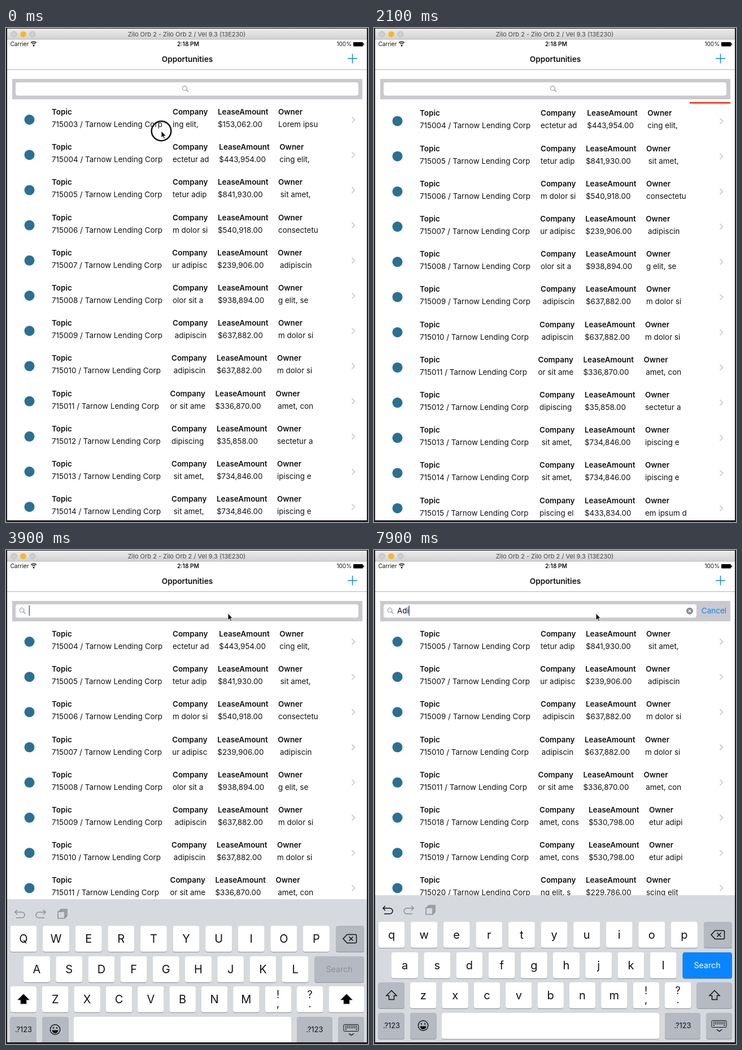
An HTML page that plays this animation: 641 by 873 pixels, repeating every 8000 ms.

```html
<!DOCTYPE html>
<html lang="en">
<head>
<meta charset="utf-8">
<title>Opportunities</title>
<style>
  html, body { margin: 0; width: 100%; height: 100%; overflow: hidden; background: #fff; }
  svg { display: block; width: 641px; height: 873px; }
  text { font: 13.45px Inter, Roboto, sans-serif; fill: #111; white-space: pre; }
  .b { font-weight: 600; }
  .mid { text-anchor: middle; }
  .line { fill: none; stroke: #111; stroke-width: 1.5; }
  .soft { stroke: #8b8e94; }
  .key { font-size: 20px; }
  .small { font-size: 12.8px; }
</style>
</head>
<body>
<svg id="stage" viewBox="0 0 641 873"></svg>
<script>
const ROW = 62.2, TOP = 131, LOOP = 8000;
const LIGHT = '#fff', DARK = '#b4b9c2', BLUE = '#0885ff';

// number, company x, company, amount, owner, company column width
const records = [
  [3, 295, 'ing elit,', '153,062', 'Lorem ipsu'],
  [4, 295, 'ectetur ad', '443,954', 'cing elit,', 82.3],
  [5, 295, 'tetur adip', '841,930', ' sit amet,'],
  [6, 295, 'm dolor si', '540,918', 'consectetu'],
  [7, 294.3, 'ur adipisc', '239,906', ' adipiscin'],
  [8, 295, 'olor sit a', '938,894', 'g elit, se'],
  [9, 295, ' adipiscin', '637,882', 'm dolor si'],
  [10, 293, ' adipiscin', '637,882', 'm dolor si'],
  [11, 290.5, 'or sit ame', '336,870', ' amet, con'],
  [12, 293, 'dipiscing ', '35,858', 'sectetur a'],
  [13, 293, ' sit amet,', '734,846', 'ipiscing e'],
  [14, 293, ' sit amet,', '734,846', 'ipiscing e'],
  [15, 293, 'piscing el', '433,834', 'em ipsum d'],
  [18, 293, 'amet, cons', '530,798', 'etur adipi', 87],
  [19, 293, 'amet, cons', '530,798', 'etur adipi', 87],
  [20, 295, 'ng elit, s', '229,786', 'scing elit']
];
const all = records.map(r => r[0]);
const results = {
  '': all.slice(1),
  A: all.slice(1),
  Ad: [4, 5, 7, 9, 10, 11, 18, 19, 20],
  Adi: [5, 7, 9, 10, 11, 18, 19, 20]
};

const text = (x, y, s, cls = '', more = '') =>
  `<text x="${x}" y="${y}" class="${cls}" ${more}>${s}</text>`;
const rect = (x, y, w, h, fill, more = '') =>
  `<rect x="${x}" y="${y}" width="${w}" height="${h}" fill="${fill}" ${more}/>`;
const path = (d, x = 0, y = 0, cls = 'line', more = '') =>
  `<path d="${d}" transform="translate(${x} ${y})" class="${cls}" ${more}/>`;
const dot = (x, y, r, fill, more = '') =>
  `<circle cx="${x}" cy="${y}" r="${r}" fill="${fill}" ${more}/>`;

function row([n, cx, company, amount, owner, w = 80]) {
  const lx = cx + w, ox = lx + 107;
  const col = (x, head, value) => text(x, 22, head, 'b') + text(x, 44, value);
  return `<g id="r${n}">${rect(9, 0, 622, ROW + .5, '#fff')}<g>` +
    dot(41.5, 31, 9, '#2a7094') +
    col(81, 'Topic', `${715000 + n} / Tarnow Lending Corp`) +
    col(cx, 'Company', company) + col(lx, 'LeaseAmount', `$${amount}.00`) +
    col(ox, 'Owner', owner) +
    path('M-2.5-5L2.5 0L-2.5 5', 615, 31, 'line', 'style="stroke:#c5c5ca"') +
    (n === 3 ? rect(631, 0, 76, ROW, '#ff2600') +
      text(667, 36, 'Delete', 'mid', 'style="fill:#fff;font-size:14px"') : '') +
    '</g></g>';
}

// keys are laid out relative to the keyboard's top edge
function key(x, y, w, fill, cls = '') {
  return rect(x, y + 1, w, 46, '#8d9096', 'rx="4"') + rect(x, y, w, 46, fill, `rx="4" class="${cls}"`);
}
function letters(s, x, y, pitch, w) {
  return [...s].map((c, i) => key(x + i * pitch, y, w, LIGHT) +
    text(x + i * pitch + w / 2, y + 30, c, 'key mid letter')).join('');
}
function keyboard() {
  const undo = 'M-4-7L-8-3L-4 1M-8-3H4a5 5 0 0 1 0 10H-6';
  const shift = 'M0-8.5L9 .5H4.5V7.5H-4.5V.5H-9Z';
  const pair = (x, a, b) => key(x, 154, 46.5, LIGHT) +
    text(x + 23.2, 175, a, 'mid', 'style="font-size:18px"') +
    text(x + 23.2, 191, b, 'mid', 'style="font-size:18px"');
  let dots = '';
  for (let j = 0; j < 3; j++) for (let i = 0; i < 7; i++)
    if (j < 2 || i < 1 || i > 5) dots += rect(601 + i * 3.1, 223.5 + j * 3, 1.8, 1.6, '#111');
  return rect(0, 0, 641, 270, '#d6d9de') +
    path(undo, 24, 26, 'line soft', 'id="undo"') +
    `<g transform="translate(62 26) scale(-1 1)">${path(undo, 0, 0, 'line soft')}</g>` +
    path('M-3-4V-8H8V4H4M-8-4H4V8H-8ZM-5-4V-6H6V6H4', 100, 26, 'line soft') +
    letters('QWERTYUIOP', 7.5, 47, 57.6, 47) +
    key(584, 47, 50, DARK) +
    path('M-12 0L-5-7.5H9.5Q11.5-7.5 11.5-5.5V5.5Q11.5 7.5 9.5 7.5H-5ZM-1.5-3.5L5.5 3.5M5.5-3.5L-1.5 3.5', 609, 70) +
    letters('ASDFGHJKL', 31, 101, 57.2, 47) +
    key(546.5, 101, 87.5, DARK, 'go') +
    text(590, 128.5, 'Search', 'mid', 'id="go" style="font-size:14.2px"') +
    key(7.5, 154, 46.5, LIGHT, 'shift') + path(shift, 31, 177, 'line arrow') +
    letters('ZXCVBNM', 64, 154, 56.35, 46.5) +
    pair(458.5, '!', ',') + pair(515, '?', '.') +
    key(571.5, 154, 62.5, LIGHT, 'shift') + path(shift, 603, 177, 'line arrow') +
    key(7.5, 208, 46.5, DARK) + text(31, 235, '.?123', 'small mid') +
    key(64, 208, 46.5, DARK) + dot(87, 230.5, 8.7, 'none', 'stroke="#111" stroke-width="1.4"') +
    dot(84, 227.5, 1.3, '#111') + dot(90, 227.5, 1.3, '#111') +
    path('M-5.5 0H5.5A5.5 5.5 0 0 1-5.5 0Z', 87, 231.5, '', 'fill="#111"') +
    key(120, 208, 385, LIGHT) +
    key(515, 208, 63, DARK) + text(546.5, 235, '.?123', 'small mid') +
    key(588, 208, 46, DARK) + rect(598, 221.5, 26, 12, 'none', 'rx="1.5" stroke="#111"') + dots +
    path('M-4.5-1.5L0 1.5L4.5-1.5', 611.5, 239);
}

const stage = document.getElementById('stage');
stage.innerHTML = `
  <defs>
    <linearGradient id="bar" x2="0" y2="1"><stop stop-color="#ececec"/><stop offset="1" stop-color="#d2d2d2"/></linearGradient>
    <clipPath id="table">${rect(9.5, 126, 621.5, 747, '#000')}</clipPath>
  </defs>
  ${rect(0, 0, 641, 873, '#fff')}
  <g clip-path="url(#table)">${records.map(row).join('')}</g>
  ${rect(0, 1, 641, 19, 'url(#bar)')}${rect(0, 19.5, 641, 1, '#b9b9b9')}
  ${dot(14, 11, 5, '#cfcfcf', 'stroke="#b9b9b9"')}${dot(30.5, 11, 5.3, '#fdb528')}${dot(47, 11, 5, '#cfcfcf', 'stroke="#b9b9b9"')}
  ${text(320, 15, 'Zilo Orb 2 - Zilo Orb 2 / Vel 9.3 (13E230)', 'mid', 'style="font-size:11px;fill:#444"')}
  ${text(7.5, 32, 'Carrier', '', 'style="font-size:10.1px"')}
  ${path('M-4.8-2.4A7 7 0 0 1 4.8-2.4M-2.9-.2A4.2 4.2 0 0 1 2.9-.2', 49, 28.5)}${dot(49, 31, 1.5, '#111')}
  ${text(322.5, 32.3, '2:18 PM', 'b mid', 'style="font-size:10.2px"')}
  ${text(612, 32, '100%', '', 'text-anchor="end" style="font-size:10px"')}
  ${rect(615, 25, 17, 7.5, '#000', 'rx="1"')}${rect(632.5, 27, 1.5, 3.5, '#000')}
  ${text(321, 60, 'Opportunities', 'b mid', 'style="font-size:13.65px"')}
  ${path('M-8.5 0H8.5M0-8.5V8.5', 613.5, 54, 'line', 'style="stroke:#1483e6"')}
  ${rect(0, 73, 641, 1, '#b4b4b6')}
  ${rect(11, 90, 620, 36, '#c9c9ce')}
  ${rect(17, 96, 607, 23.5, '#fff', 'id="field" rx="4"')}
  <g id="lens"><circle cx="-1.2" cy="-1.3" r="3.9" class="line soft" style="stroke-width:1.1"/>${path('M1.7 1.6L5.3 5.2', 0, 0, 'line soft', 'style="stroke-width:1.3"')}</g>
  ${text(41, 112, '', '', 'id="query" style="font-size:13.5px"')}
  ${rect(40.6, 98, 1.6, 18, '#3f63d2', 'id="caret"')}
  <g id="clear">${dot(559, 107.7, 6, '#8a8a8f')}${path('M-2.3-2.3L2.3 2.3M2.3-2.3L-2.3 2.3', 559, 107.7, 'line', 'style="stroke:#fff;stroke-width:1.2"')}</g>
  ${text(602, 112, 'Cancel', 'mid', `id="cancel" style="fill:${BLUE};font-size:13.5px"`)}
  <g id="keys">${keyboard()}</g>
  <g id="mouse"><circle id="ring" r="17.3" class="line" style="stroke-width:2.5"/>
    ${path('M0 0V12L2.8 9.5L4.7 13.8L6.6 13L4.7 8.8H8.4Z', 0, 0, '', 'fill="#111" stroke="#fff" stroke-width=".8"')}</g>
  ${rect(0, 0, 641, 1, '#1b1b1b')}${rect(0, 0, 2, 873, '#1b1b1b')}${rect(639, 0, 2, 873, '#1b1b1b')}${rect(0, 870, 641, 3, '#1b1b1b')}`;

const $ = id => document.getElementById(id);
const each = (sel, fn) => stage.querySelectorAll(sel).forEach(fn);
const show = (node, on) => node.style.display = on ? '' : 'none';
const move = (node, x, y) => node.setAttribute('transform', `translate(${x} ${y})`);

// linear interpolation over [time, value] steps
function at(t, steps) {
  let [t0, v0] = steps[0];
  for (const [t1, v1] of steps) {
    if (t < t1) return t <= t0 ? v0 : v0 + (v1 - v0) * (t - t0) / (t1 - t0);
    [t0, v0] = [t1, v1];
  }
  return v0;
}

const swipe = [[0, 0], [100, -8], [300, -42], [500, -66], [700, -72]];
const collapse = [[1600, 0], [1700, .08], [1800, .3], [1900, .6], [2000, .85], [2100, .96], [2200, 1]];
const rise = [[3500, 873], [3600, 867], [3700, 740], [3800, 655], [3900, 617], [4000, 610]];
const lensX = [[3500, 317.7], [3600, 317], [3700, 175], [3800, 62], [3900, 29.3]];
const mouseX = [[0, 275], [700, 200], [1000, 200], [2500, 470], [2700, 455], [3200, 377], [3600, 377], [3900, 393]];
const mouseY = [[0, 182], [1000, 182], [2500, 140], [2700, 135], [3200, 110], [3600, 110], [3900, 112]];
const blink = [[4400, 1], [4500, .5], [4600, 0], [4900, 0], [5000, 1], [5200, 1], [5300, .5], [5400, 0],
  [5500, 0], [5600, 1], [5700, 1], [5800, .5], [5900, 0], [6100, 0], [6200, 1], [6400, 1], [6500, .5],
  [6600, 0], [6800, 0], [6900, 1]];
const typing = [[7800, 'Adi'], [7600, 'Ad'], [7400, 'A'], [0, '']];

function draw(t) {
  const query = typing.find(s => t >= s[0])[1];
  const typed = query !== '';

  const gone = at(t, collapse);
  const list = gone < 1 ? all : results[query];
  const lift = list === all ? gone : 0;
  for (const n of all) {
    const i = list.indexOf(n), node = $('r' + n);
    show(node, i >= 0);
    move(node, 0, TOP + (i && i - lift) * ROW);
  }
  move($('r3').lastChild, at(t, swipe), 0);

  const side = at(t, [[7300, 0], [7400, .3], [7500, .75], [7700, 1]]);
  $('field').setAttribute('width', 607 - 53 * side);
  show($('cancel'), side > 0);
  move($('cancel'), 45 * (1 - side), 0);
  $('cancel').style.opacity = side;
  show($('clear'), typed);
  move($('clear'), 53 * (1 - side), 0);
  move($('lens'), at(t, lensX), 107.7);
  $('query').textContent = query;
  move($('caret'), typed ? $('query').getComputedTextLength() : 0, 0);
  $('caret').style.opacity = t < 3600 ? 0 : at(t, blink);

  show($('keys'), t >= 3600);
  move($('keys'), 0, at(t, rise));
  each('.letter', k => k.textContent = typed ? k.textContent.toLowerCase() : k.textContent.toUpperCase());
  each('.shift', k => k.setAttribute('fill', typed ? DARK : LIGHT));
  each('.arrow', k => k.style.fill = typed ? 'none' : '#000');
  each('.go', k => k.setAttribute('fill', typed ? BLUE : DARK));
  $('go').style.fill = typed ? '#fff' : '#8b9099';
  $('undo').style.stroke = typed ? '#111' : '';

  show($('mouse'), t < 1000 || t >= 2500);
  show($('ring'), t < 900);
  move($('mouse'), at(t, mouseX), at(t, mouseY));
}

const start = performance.now();
function tick(now) {
  const t = Math.max(0, now - start) % LOOP;
  draw(Math.floor(t / 100) * 100);
  requestAnimationFrame(tick);
}
draw(0);
requestAnimationFrame(tick);
</script>
</body>
</html>
```
